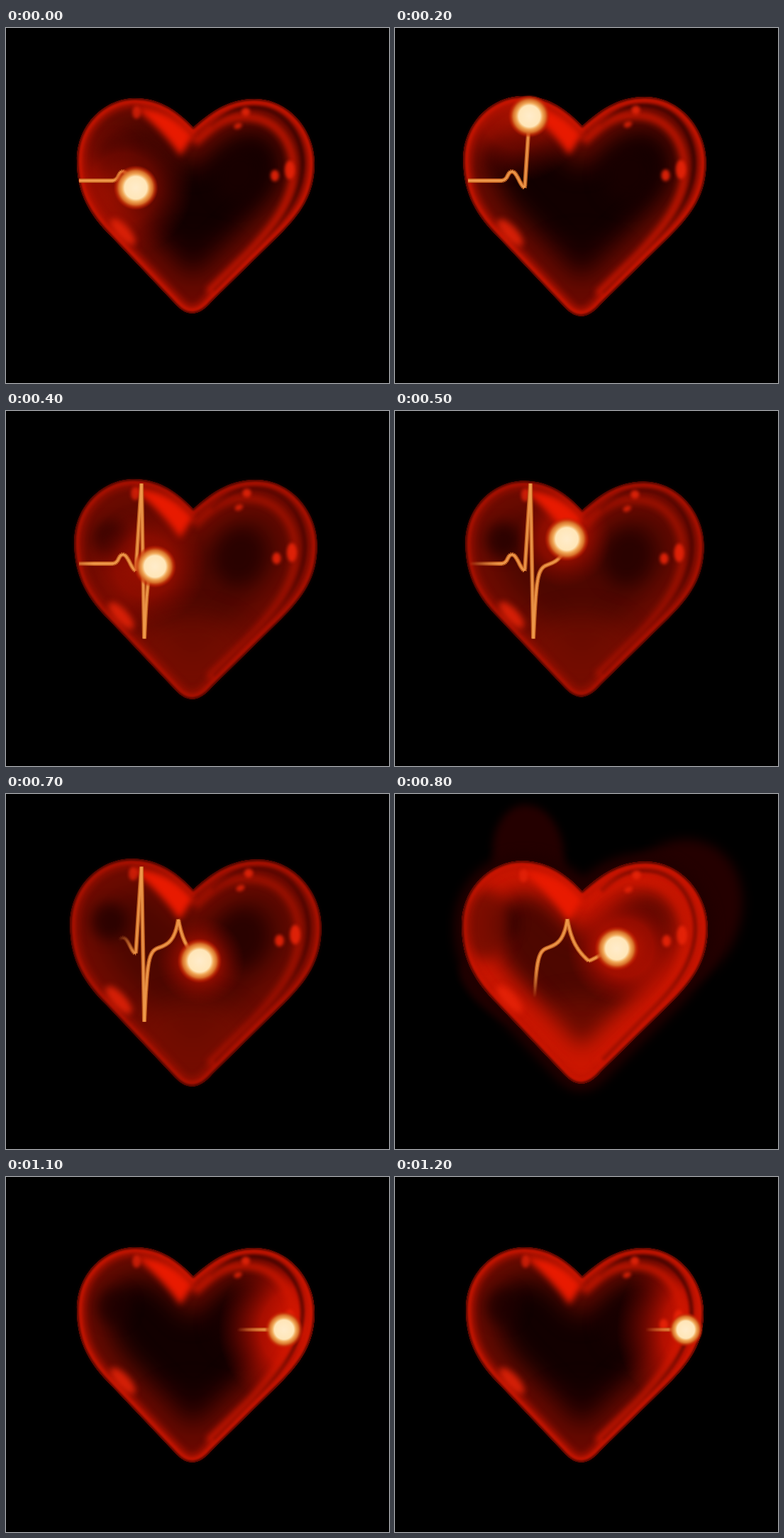
An HTML page with a canvas that plays this animation: 540x500 px, repeating every 1400 ms.

```html
<!DOCTYPE html>
<html lang="en">
<head>
<meta charset="utf-8">
<title>Heartbeat</title>
<style>
  html, body { margin: 0; width: 100%; height: 100%; overflow: hidden; background: #000; }
  canvas { display: block; }
</style>
</head>
<body>
<canvas id="stage" width="540" height="500"></canvas>
<script>
const ctx = document.getElementById('stage').getContext('2d');
const LOOP = 1400;
const TICK = 100;
const CENTER = [267, 232];

const heart = new Path2D(`M264 140 C285 122 310 100 350 100 C400 100 435 145 435 190
  C435 235 415 262 385 292 L290 385 Q264 416 240 390 L148 293
  C120 265 100 235 100 187 C100 135 140 99 182 99 C220 99 245 120 264 140Z`);
const ridge = new Path2D(`M266 162 C290 140 305 125 335 125 C385 125 407 165 405 205
  C403 250 370 287 340 319 L285 372`);
const groove = new Path2D(`M290 140 C310 121 325 112 348 112 C395 112 419 155 418 193
  C416 240 385 275 355 305 L292 369`);
const shine = new Path2D('M182 112 Q230 112 264 152 L246 180 Q222 145 182 112Z');

// The pulse line, one stroke of the heartbeat per part.
const parts = [
  'M103 215H150C160 215 158 202 165 202S177 224 183 225',
  'L191 102', 'L195 321',
  'C199 240 200 222 214 217', 'S238 208 243 176',
  'C248 205 256 220 273 235', 'C285 232 300 215 335 215H356', 'H410'
];
const pulse = document.createElementNS('http://www.w3.org/2000/svg', 'path');
const reach = [0, ...parts.map((_, i) => {
  pulse.setAttribute('d', parts.slice(0, i + 1).join(''));
  return pulse.getTotalLength();
})];

const clamp = v => Math.max(0, Math.min(1, v));
const bump = (t, center, width) => Math.exp(-(((t - center) / width) ** 2));

// Piecewise linear motion through [time, value] keys.
function track(t, keys) {
  const next = keys.findIndex(([time]) => time >= t);
  if (next <= 0) return keys.at(next)[1];
  const [[t0, v0], [t1, v1]] = keys.slice(next - 1, next + 1);
  return v0 + (v1 - v0) * (t - t0) / (t1 - t0);
}

// Length along the pulse line after a fractional number of parts.
function lengthAt(part) {
  const i = Math.max(0, Math.min(Math.floor(part), parts.length - 1));
  return reach[i] + (reach[i + 1] - reach[i]) * (part - i);
}

function pointAt(length) {
  const { x, y } = pulse.getPointAtLength(length);
  return [x, y];
}

function soft(blur, alpha, paint) {
  ctx.save();
  ctx.filter = blur ? `blur(${blur}px)` : 'none';
  ctx.globalAlpha = alpha;
  paint();
  ctx.restore();
}

function strokePath(path, color, width, blur, alpha = 1) {
  soft(blur, alpha, () => {
    ctx.strokeStyle = color;
    ctx.lineWidth = width;
    ctx.stroke(path);
  });
}

function fillPath(path, color, blur, alpha = 1) {
  soft(blur, alpha, () => {
    ctx.fillStyle = color;
    ctx.fill(path);
  });
}

function spot(x, y, rx, ry, angle, color, blur, alpha = 1) {
  const path = new Path2D();
  path.ellipse(x, y, rx, ry, angle, 0, Math.PI * 2);
  fillPath(path, color, blur, alpha);
}

function radial(x, y, radius, stops) {
  const gradient = ctx.createRadialGradient(x, y, 0, x, y, radius);
  stops.forEach(([at, color]) => gradient.addColorStop(at, color));
  ctx.fillStyle = gradient;
  ctx.fillRect(x - radius, y - radius, radius * 2, radius * 2);
}

function drawAura() {
  spot(188, 85, 50, 70, -.1, '#240000', 6);
  spot(395, 170, 90, 110, .5, '#240000', 8);
  spot(175, 285, 92, 40, .5, '#200000', 6);
  strokePath(heart, '#200000', 34, 7);
}

function drawLight([x, y]) {
  const offset = x - CENTER[0];
  const alpha = .5 + .45 * clamp(offset / 80);
  radial(x + offset * .2, y, 55 + Math.abs(offset) * .5, [
    [0, `rgba(235,26,0,${alpha})`],
    [.5, `rgba(225,20,0,${alpha * .75})`],
    [1, 'rgba(180,10,0,0)']
  ]);
}

function drawGloss(gloss) {
  strokePath(heart, '#b81400', 24, 4, gloss * .8);
  strokePath(groove, '#2a0200', 6, 2, gloss * .7);
  strokePath(ridge, '#d01800', 11, 4, gloss * .85);
  strokePath(heart, '#d81800', 13, 2, gloss * .7);
  strokePath(heart, '#380400', 4, 1.5, .9);
  fillPath(shine, '#e81a00', 5);
  spot(165, 287, 9, 24, -.75, '#e82408', 4, .85);
  spot(184, 119, 6, 9, 0, '#e82408', 2, .7);
  spot(338, 118, 6, 6, 0, '#e82408', 2, .85);
  spot(327, 138, 6, 4, -.4, '#e82408', 2, .8);
  spot(379, 208, 6, 8, 0, '#e82408', 2, .9);
  spot(400, 200, 7, 13, 0, '#e82408', 2, .9);
}

function drawHeart(scale, ambient, flaring, ball) {
  ctx.save();
  ctx.translate(...CENTER);
  ctx.scale(scale, scale);
  ctx.translate(-CENTER[0], -CENTER[1]);
  fillPath(heart, '#400500', 2, .7);
  ctx.clip(heart);

  fillPath(heart, '#0d0000', 0);
  strokePath(heart, '#680a00', 84, 18);
  fillPath(heart, '#700c00', 0, ambient);
  spot(262, 345, 80, 60, 0, '#780e00', 16, ambient);
  spot(328, 205, 36, 42, .3, '#1c0000', 12, .7);
  spot(152, 182, 24, 25, 0, '#1c0000', 9, .7);
  if (flaring) {
    strokePath(heart, '#e81a00', 84, 14, .75);
    spot(130, 185, 34, 48, 0, '#700c00', 10, .85);
  }
  drawLight(ball);
  drawGloss(1 - ambient * .65);
  ctx.restore();
}

function drawTrail(head, tail) {
  const step = 2, fade = 45;
  for (const [color, width] of [['#c4601f', 6], ['#f09a4c', 3.2]]) {
    for (let at = Math.max(0, tail); at < head; at += step) {
      const line = new Path2D();
      line.moveTo(...pointAt(at));
      line.lineTo(...pointAt(Math.min(at + step, head)));
      strokePath(line, color, width, 0, clamp((at - tail) / fade));
    }
  }
}

function drawBall([x, y], core) {
  radial(x, y, core * 1.75, [
    [0, '#ffeccb'],
    [.5, '#ffe6b8'],
    [.62, '#f0a858'],
    [.76, '#d8702a'],
    [.88, 'rgba(200,50,8,.65)'],
    [1, 'rgba(200,20,0,0)']
  ]);
}

function draw(t) {
  const head = lengthAt(track(t, [[0, 1], [2, 1.82], [3, 3], [5, 4.92], [7, 6], [9, 7], [12, 8]]));
  const tail = lengthAt(track(t, [[0, -.5], [3, -.5], [5, 0], [7, .6], [9, 6], [12, 6.95]]));
  const scale = 1 + .045 * bump(t, 3, 1.2) + .06 * bump(t, 7.2, 1.1);
  const core = 18 - 6 * bump(t, 3, .7) - 4 * bump(t, 12, 1.5);
  const ambient = t >= 3 && t < 9 ? .65 : .05;
  const flaring = t === 3 || t === 8;
  const ball = pointAt(head);

  ctx.fillStyle = '#000';
  ctx.fillRect(0, 0, 540, 500);
  if (flaring) drawAura();
  drawHeart(scale, ambient, flaring, ball);
  drawTrail(head, tail);
  drawBall(ball, core);
}

const start = performance.now();
let shown = -1;
function frame() {
  let tick = Math.floor(((performance.now() - start) % LOOP) / TICK);
  if (tick === 10 || tick === 13) tick--; // these poses are held twice as long
  if (tick !== shown) draw(shown = tick);
  requestAnimationFrame(frame);
}
frame();
</script>
</body>
</html>
```
